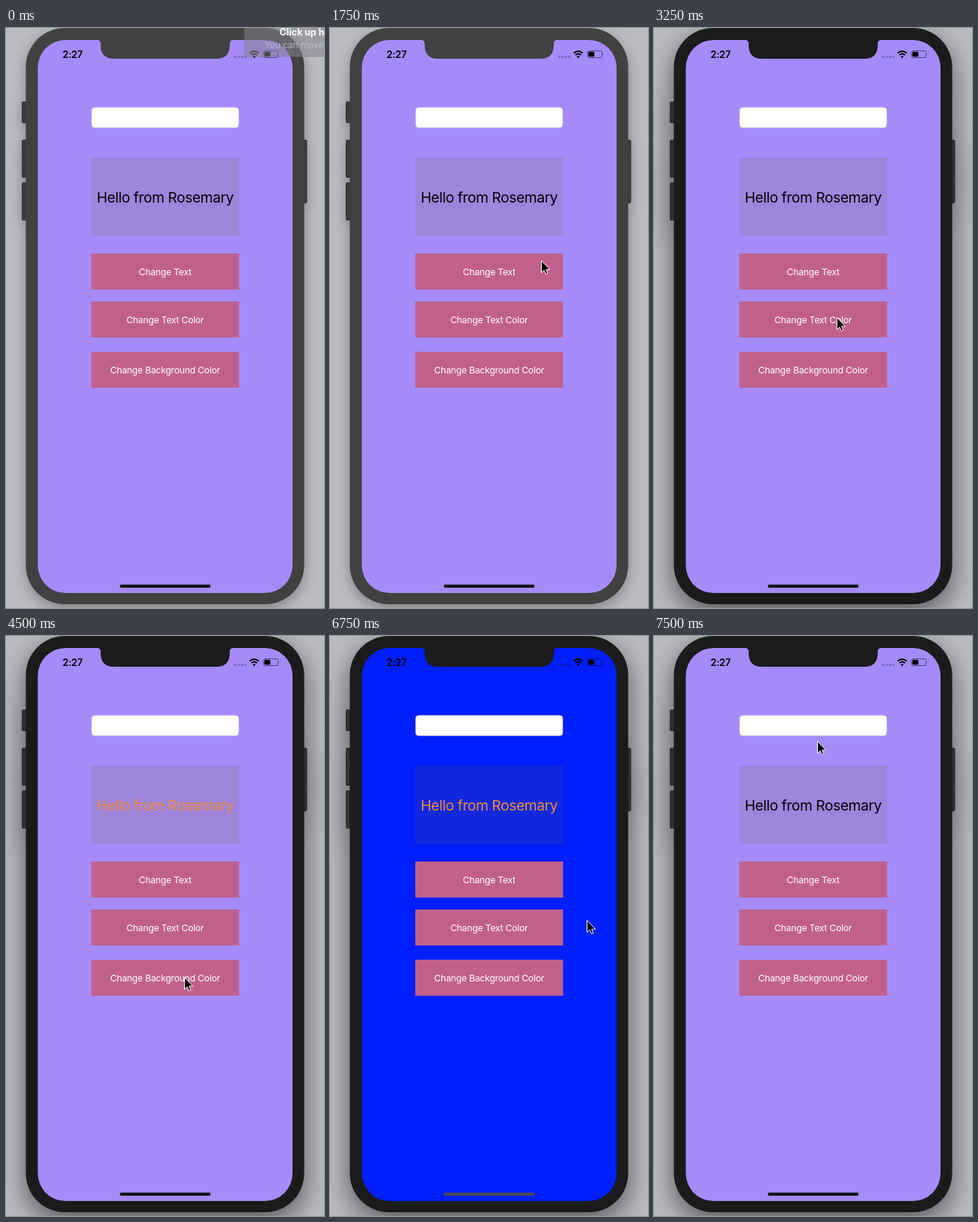
These frames come from a looping animation (425 by 774 pixels, 8000 ms). An HTML page:

```html
<!DOCTYPE html>
<html lang="en">
<head>
<meta charset="utf-8">
<title>Phone demo</title>
<style>
  html, body { margin: 0; width: 100%; height: 100%; overflow: hidden; background: #bbbcc2; }
  svg { display: block; width: 425px; height: 774px; font-family: Inter, Roboto, sans-serif; }
  .phone { --bezel: #414141; --key: #3b3b3e; --screen: #a58bfa; --label: #000; --home: #151517;
    filter: drop-shadow(0 6px 9px rgba(0, 0, 0, .3)); }
  .phone.active { --bezel: #1b1b1b; --key: #303032;
    filter: drop-shadow(0 12px 18px rgba(0, 0, 0, .55)); }
  .phone.tinted { --label: #ee8b3e; }
  .phone.blue { --screen: #001ffb; --home: #4a4a55; }
  .bezel { fill: var(--bezel); }
  .key { fill: var(--key); }
  .screen { fill: var(--screen); }
  .home { fill: var(--home); }
  .hello { fill: var(--label); font-size: 19.3px; letter-spacing: -.022em; text-anchor: middle; }
  .button rect { fill: #c1608d; }
  .button text { fill: #fff; font-size: 12.2px; letter-spacing: -.018em; text-anchor: middle; }
</style>
</head>
<body>
<svg viewBox="0 0 425 774">
  <rect width="425" height="774" fill="#bbbcc2"/>
  <g class="phone" id="phone">
    <g class="key">
      <rect x="21" y="98" width="8" height="29" rx="2"/>
      <rect x="21" y="149" width="8" height="51" rx="2"/>
      <rect x="21" y="206" width="8" height="51" rx="2"/>
      <rect x="395" y="149" width="7.5" height="85" rx="2"/>
    </g>
    <rect class="bezel" x="26.5" y="0" width="372" height="769" rx="52"/>
    <rect class="screen" x="42.5" y="16" width="340.5" height="738" rx="37"/>
    <path class="bezel" d="M121 15.5Q126.500 16 126.500 21V23Q126.500 41 144.500 41H281Q299 41 299 23V21Q299 16 304.500 15.500Z"/>

    <text x="75.500" y="39.700" font-size="13" font-weight="600" letter-spacing="-.2">2:27</text>
    <g opacity=".27">
      <circle cx="306.500" cy="38.500" r="1.500"/><circle cx="311" cy="38.500" r="1.500"/>
      <circle cx="315.300" cy="38.500" r="1.500"/><circle cx="319.500" cy="38.500" r="1.500"/>
    </g>
    <path d="M325.800 33.500Q331.800 28.300 337.800 33.500M328 36Q331.800 32.800 335.600 36" fill="none" stroke="#000" stroke-width="1.900"/>
    <path d="M329.800 38.100Q331.800 36.500 333.800 38.100L331.800 40.200Z"/>
    <rect x="344" y="30.500" width="19.500" height="9" rx="2.500" fill="none" stroke="#000" stroke-opacity=".5"/>
    <rect x="345.300" y="31.800" width="8" height="6.400" rx="1.200"/>
    <path d="M364.500 33.500Q366 35 364.500 36.500Z" opacity=".5"/>

    <rect x="114.500" y="106" width="196.500" height="27" rx="4" fill="#fff" stroke="#cbc8d6" stroke-width=".8"/>
    <rect x="114" y="173" width="197.500" height="105" fill="rgb(120,93,50)" fill-opacity=".15"/>
    <text class="hello" x="212.700" y="232.500">Hello from Rosemary</text>
    <g id="buttons"></g>
    <rect class="home" x="152" y="742.700" width="121.500" height="4.300" rx="2.150"/>
  </g>

  <g id="tip">
    <rect x="319" y="-6" width="120" height="44" fill="#85838f" fill-opacity=".55" stroke="#77757f" stroke-opacity=".6"/>
    <text x="365.500" y="10" font-size="12.500" font-weight="700" fill="#fff">Click up here</text>
    <text x="345.500" y="27" font-size="12" letter-spacing="-.1" fill="#c6c5cd" fill-opacity=".75">You can move</text>
  </g>
  <path id="cursor" d="M.5.5V16.500L4.200 13.200L6.600 18.600L9 17.500L6.700 12.200H11.700Z" stroke="#fff" stroke-width="1"/>
</svg>
<script>
const LOOP = 8000;
const byId = id => document.getElementById(id);
const phone = byId("phone"), tip = byId("tip"), cursor = byId("cursor");

// Pointer stops: [time, x, y]; the pointer jumps from one to the next.
const stops = [
  [1000, 361, 20], [1250, 331, 27], [1500, 300, 226], [1750, 282, 310],
  [2250, 281, 312], [2500, 250, 366], [2750, 244, 386], [4000, 240, 425],
  [4250, 236, 453], [4500, 238, 455], [6000, 271, 417], [6250, 343, 379],
  [7250, 242, 223], [7500, 218, 140]
];

byId("buttons").innerHTML = [["Change Text", 301], ["Change Text Color", 365], ["Change Background Color", 432]]
  .map(([label, y]) => `<g class="button"><rect x="114" y="${y}" width="197.5" height="48"/>
    <text x="212.700" y="${y + 28.5}">${label}</text></g>`).join("");
const [, colorLabel, backLabel] = document.querySelectorAll(".button text");

const within = (t, from, to) => t >= from && t < to;

function draw(t) {
  phone.classList.toggle("active", t >= 3250);
  phone.classList.toggle("tinted", within(t, 3500, 7500));
  phone.classList.toggle("blue", within(t, 5000, 7500));
  colorLabel.style.opacity = within(t, 3500, 3750) ? .22 : 1;
  backLabel.style.opacity = within(t, 5000, 5250) ? .22 : within(t, 5250, 5500) ? .7 : 1;
  tip.style.display = t < 250 ? "" : "none";

  const stop = stops.filter(([start]) => start <= t).pop();
  cursor.style.display = stop ? "" : "none";
  if (stop) cursor.setAttribute("transform", `translate(${stop[1]} ${stop[2]})`);
}

const begin = performance.now();
function tick() {
  draw((performance.now() - begin) % LOOP);
  requestAnimationFrame(tick);
}
tick();
</script>
</body>
</html>
```
